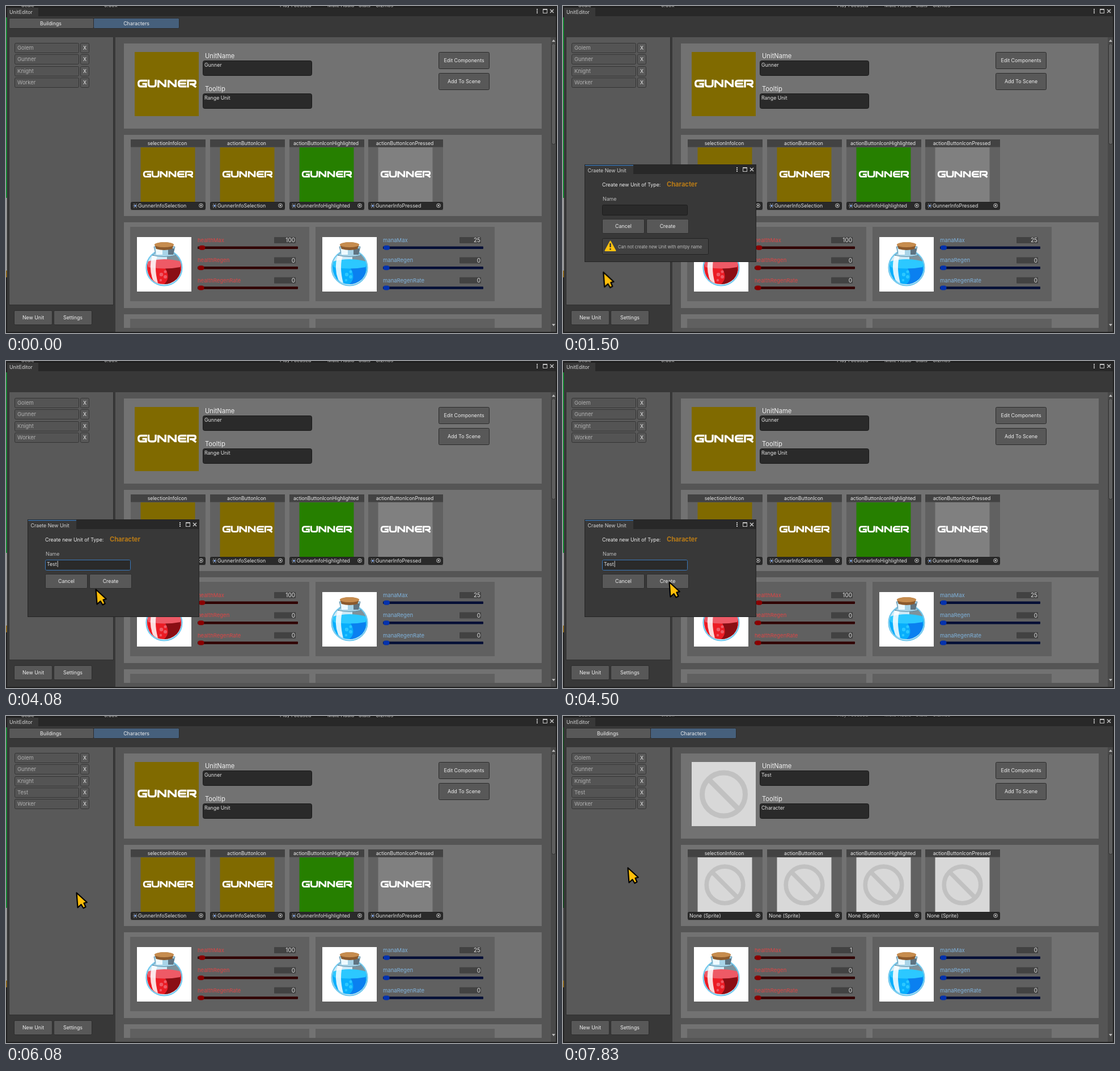
These frames come from a looping animation (972x576 px, 8000 ms). An HTML page:

```html
<!DOCTYPE html>
<html lang="en">
<head>
<meta charset="utf-8">
<title>Unit editor</title>
<style>
  html, body { margin: 0; width: 100%; height: 100%; overflow: hidden; background: #383838; }
  svg { display: block; width: 972px; height: 576px; }
  text { font-family: Inter, Roboto, sans-serif; white-space: pre; }
</style>
</head>
<body>
<svg id="stage" viewBox="0 0 972 576" xmlns="http://www.w3.org/2000/svg"></svg>
<script>
const LOOP = 8000;
const BLUE = '#46607c';

// Drawing helpers
const rect = (x, y, w, h, fill, rx = 0) =>
  `<rect x="${x}" y="${y}" width="${w}" height="${h}" fill="${fill}" rx="${rx}"/>`;
const framed = (x, y, w, h, fill, line = '#2c2c2c', rx = 2) =>
  `<rect x="${x + .5}" y="${y + .5}" width="${w - 1}" height="${h - 1}" fill="${fill}" stroke="${line}" rx="${rx}"/>`;
const text = (x, y, s, fill = '#e2e2e2', size = 8.8, anchor = 'start', weight = 400) =>
  `<text x="${x}" y="${y}" fill="${fill}" font-size="${size}" text-anchor="${anchor}" font-weight="${weight}">${s}</text>`;
const path = (d, fill, extra = '') => `<path d="${d}" fill="${fill}" ${extra}/>`;
const line = (d, color, width = 1) => path(d, 'none', `stroke="${color}" stroke-width="${width}"`);
const use = (id, x, y, scale = 1) => `<use href="#${id}" transform="translate(${x} ${y}) scale(${scale})"/>`;
const button = (x, y, w, h, label, fill = '#585858') =>
  framed(x, y, w, h, fill) + text(x + w / 2, y + h / 2 + 3.2, label, '#eee', 8.8, 'middle');

// Groups visible only in [from, to), registered in document order
const shown = [];
const during = (from, to, body) => {
  shown.push([from, to]);
  return `<g class="timed">${body}</g>`;
};

const LETTERS = [
  [5, 'M17 1.7H6Q1.7 1.7 1.7 6.9Q1.7 12 6 12H15V7.3H8.5'],
  [22.8, 'M1.7 0V8Q1.7 12 6 12H10.7Q14.3 12 14.3 8V0'],
  [40, 'M1.7 13.7V2.3L3 2.3L13 11.4H14.3V0'],
  [58, 'M1.7 13.7V2.3L3 2.3L13 11.4H14.3V0'],
  [75.8, 'M15.5 1.7H6Q1.7 1.7 1.7 6.9Q1.7 12 6 12H15.5M2 6.9H14.5'],
  [92.3, 'M1.7 13.7V1.7H12.5Q15 1.7 15 4.6Q15 8 12.5 8H5M9 8L16 13.2']
];

function potion(id, main, dark, light) {
  return `<g id="${id}">` + rect(0, 0, 96, 96, '#fff') +
    `<circle cx="48" cy="54" r="31.5" fill="#cfeaf6"/>` +
    path('M53 26Q78 30 77 46H53Z', '#7f929b') +
    path('M19 44Q48 38 77 44Q82 60 70 74Q60 83 48 83Q34 83 25 74Q15 60 19 44Z', main) +
    path('M50 55L76 52Q79 64 70 74Q60 83 48 83Q60 72 50 55Z', dark) +
    path('M19 43Q48 35 77 43Q79 49 76 53Q48 58 20 53Q18 48 19 43Z', light) +
    path('M27 33Q33 29 37 29Q29 52 37 81Q31 79 28 75Q20 54 27 33Z', '#fff', 'opacity=".85"') +
    `<circle cx="48" cy="54" r="31.5" fill="none" stroke="#72c9ee" stroke-width="2.2"/>` +
    path('M30 17H67L65 25Q63 30 69 32Q48 37 27 32Q33 30 32 25Z', '#a8d4e8', 'stroke="#5a8ca6"') +
    path('M33 21H45V31H34Z', '#eefaff') + path('M55 20H66L64 31H55Z', '#5f7482') +
    path('M31 13Q48 5 65 13L62 21Q48 25 34 21Z', '#8c5a2d') +
    `<ellipse cx="48" cy="13.5" rx="17" ry="4.5" fill="#c68c4e"/>` +
    [[50, 61, 2.5], [43, 66, 3.2], [50, 70, 3], [42, 76, 2.2]].map(([x, y, r]) =>
      `<circle cx="${x}" cy="${y}" r="${r}" fill="${light}"/>`).join('') + '</g>';
}

const defs = '<defs>' +
  '<g id="gunner" fill="none" stroke="#fff" stroke-width="3.4">' +
  LETTERS.map(([x, d]) => `<path transform="translate(${x} 48.8)" d="${d}"/>`).join('') + '</g>' +
  '<g id="empty">' + rect(0, 0, 113, 113, '#d8d8d8') +
  '<circle cx="56.5" cy="57" r="38" fill="none" stroke="#c1c1c1" stroke-width="9"/>' +
  line('M30 30.5L83 83.5', '#c1c1c1', 9) + '</g>' +
  potion('red', '#ec1c24', '#8a0e14', '#ee5a66') +
  potion('blue', '#08aefc', '#0a80f0', '#2cc8ff') + '</defs>';

const windowIcons = (x, y) =>
  [-3, 0, 3].map(d => rect(x - 1, y + d - 1, 2, 2, '#c4c4c4')).join('') +
  `<rect x="${x + 10.5}" y="${y - 3}" width="7" height="6.5" fill="none" stroke="#c4c4c4"/>` +
  line(`M${x + 10} ${y - 3}h8`, '#c4c4c4', 2) +
  line(`M${x + 23} ${y - 3}l6 6m0 -6l-6 6`, '#c4c4c4', 1.5);

function backdrop() {
  const strip = (y, c) => [[27, 'Scale'], [173, '0.60x'], [483, 'Play Focused'], [567, 'Mute Audio'],
    [622, 'Stats'], [652, 'Gizmos']].map(([x, s]) => text(x, y, s, c)).join('');
  const edge = (c, grey) => rect(0, 20, 1.5, 318, c) + rect(0, 338, 1.5, 128, grey) + rect(0, 466, 1.5, 12, '#a87a1c');
  return rect(0, 0, 972, 576, '#202020') +
    during(0, 7380, strip(2, '#c4c4c4') + edge('#12a538', '#b4b4b4')) +
    during(7380, LOOP, strip(1, '#8c8c8c') + edge('#124f20', '#5c5c5c'));
}

function chrome() {
  return rect(2, 3, 968, 571, '#383838') + rect(57, 3, 913, 15, '#282828') +
    text(6, 14.2, 'UnitEditor', '#d2d2d2') + windowIcons(937, 9) +
    rect(5, 55, 185, 472, '#2e2e2e') + rect(6, 55, 183, 471, '#595959') +
    rect(193, 55, 777, 519, '#555') +
    rect(961, 55, 9, 519, '#494949') + framed(962, 66, 8, 178, '#5f5f5f', '#333', 3) +
    path('M963 63h6l-3 -4z', '#bbb') + path('M963 560h6l-3 4z', '#bbb');
}

const tabs = () => framed(5, 21, 150, 19, '#585858') + framed(154, 21, 152, 19, BLUE) +
  text(79, 33.7, 'Buildings', '#eee', 8.8, 'middle') + text(230, 33.7, 'Characters', '#eee', 8.8, 'middle');

function row(i, name, fill = '#545454') {
  const y = Math.round(65 + i * 20.3);
  return framed(15, y, 114, 18, fill, '#343434') + text(20, y + 11.8, name, '#b0b0b0', 9.5) +
    framed(131, y, 16, 18, '#585858', '#343434') + text(139, y + 12, 'X', '#eee', 8.8, 'middle');
}

const sidebar = () => ['Golem', 'Gunner', 'Knight'].map((n, i) => row(i, n)).join('') +
  during(0, 5500, row(3, 'Worker')) +
  during(5500, LOOP, row(3, 'Test') + row(4, 'Worker')) +
  during(7380, 7420, row(3, 'Test', BLUE)) +
  button(14, 536, 68, 26, 'New Unit') + button(84, 536, 68, 26, 'Settings') +
  during(1080, 1250, button(14, 536, 68, 26, 'New Unit', BLUE));

function cards() {
  const panels = (y, h) => rect(219, y, 316, h, '#606060') + rect(546, y, 316, h, '#606060');
  const field = (y, label) => text(351, y - 4.2, label, '#f0f0f0', 11.2) + framed(347, y, 193, 27, '#2a2a2a', '#191919', 3);
  const heads = ['selectionInfoIcon', 'actionButtonIcon', 'actionButtonIconHighlighted', 'actionButtonIconPressed'];
  return [[66, 150], [227, 143], [381, 151], [543, 24]].map(([y, h]) => rect(208, y, 737, h, '#727272')).join('') +
    field(96, 'UnitName') + field(154, 'Tooltip') +
    button(763, 81, 90, 30, 'Edit Components') + button(763, 118, 90, 30, 'Add To Scene') +
    heads.map((h, i) => {
      const x = Math.round(220 + i * 139.8);
      return rect(x, 235, 132, 125, '#616161') + rect(x, 235, 132, 13.5, '#424242') +
        text(x + 64.5, 244.8, h, '#eee', 8.6, 'middle') + framed(x, 345, 132, 14, '#2a2a2a', '#202020') +
        `<circle cx="${x + 124}" cy="351.5" r="3.4" fill="none" stroke="#c4c4c4"/>` +
        `<circle cx="${x + 124}" cy="351.5" r="1.4" fill="#c4c4c4"/>`;
    }).join('') +
    panels(389, 131) + panels(551, 16) + use('red', 231, 407) + use('blue', 558, 407);
}

function stats(health, mana) {
  const set = (x, name, color, track, knob, top) => ['Max', 'Regen', 'RegenRate'].map((part, i) => {
    const y = 407 + i * 35.4, value = i ? 0 : top;
    return text(x, y + 8.8, name + part, color, 9.5) + rect(x + 135, y, 38, 11, '#424242', 1) +
      text(x + 172, y + 9.2, value, '#e0e0e0', 10, 'end') + rect(x, y + 16.5, 177, 4.5, track, 1) +
      rect(x + .5 + value * .018, y + 14.8, 11, 8, knob, 4);
  }).join('');
  return set(338, 'health', '#dc4646', '#300202', '#8a0000', health) +
    set(665, 'mana', '#7fb2dc', '#040f36', '#0532ac', mana);
}

function unit(name, tip, fills, sprites) {
  const image = (x, y, s, fill) => fill
    ? rect(x, y, 113 * s, 113 * s, fill) + use('gunner', x, y, s)
    : use('empty', x, y, s);
  return text(350, 107, name) + text(350, 164.6, tip) + image(227, 81, 1, fills[0]) +
    sprites.map((s, i) => {
      const x = Math.round(220 + i * 139.8);
      const icon = fills[i] ? `<rect x="${x + 5}" y="349" width="6" height="6" fill="none" stroke="#aaa" stroke-dasharray="2 2"/>` +
        rect(x + 6.5, 350.5, 3, 3, '#8fb8ff') : '';
      return image(x + 17.5, 249, 96 / 113, fills[i]) + icon + text(x + (icon ? 13 : 3), 355, s);
    }).join('');
}

function dialog() {
  const typing = [[2710, '', 71.5], [2830, 'T', 77.5], [3080, 'Te', 83], [3290, 'Tes', 87.7], [3630, 'Test', 90.7]];
  const warning = framed(69, 409, 188, 29, '#414141', '#232323') +
    path('M83.5 414.5L92.5 431H74.5Z', '#ffc20e', 'stroke="#ffc20e" stroke-width="2" stroke-linejoin="round"') +
    rect(82.3, 418, 2.4, 7, '#333') + rect(82.3, 427, 2.4, 2.4, '#333') +
    text(97, 426.5, 'Can not create new Unit with emtpy name', '#bcbcbc', 7.5);
  return during(1250, 5500,
    framed(38, 279, 303, 172, '#383838', '#242424', 0) + rect(39, 280, 301, 16, '#282828') +
    rect(39, 280, 85, 16, '#383838') + rect(39, 280, 85, 1.3, '#3a79bb') +
    text(43.5, 292.8, 'Craete New Unit', '#d2d2d2') + windowIcons(307, 288) +
    text(69, 317.8, 'Create new Unit of Type:', '#eee') +
    text(183, 318.4, 'Character', '#b97b17', 11.1, 'start', 700) +
    text(70, 342.6, 'Name', '#bcbcbc') +
    framed(69, 350, 151, 19, '#2a2a2a', '#1c1c1c') +
    button(69, 375, 75, 26, 'Cancel') + button(147, 375, 75, 26, 'Create')) +
    during(1250, 2830, warning) +
    during(2710, 5500, `<rect x="69.5" y="350.5" width="150" height="18" rx="2" fill="none" stroke="#3a79bb"/>`) +
    typing.map(([t, s, x], i) =>
      during(t, i < 4 ? typing[i + 1][0] : 5500, text(72, 361, s) + rect(x, 352, 1, 11, '#ccc'))).join('') +
    during(5000, 5500, button(147, 375, 75, 26, 'Create', BLUE));
}

const cursor = () => {
  const beam = 'M-6 -11H6M0 -11V12M-6 12H6';
  const arrow = path('M-.5 -.5L1.5 25.5L7.5 20L11.5 26.5L15.5 24.2L12.5 17.5L17.8 16.2Z', '#ffbf0a',
    'stroke="#000" stroke-width="2.2" stroke-linejoin="round"');
  return '<g id="cursor">' + during(380, 1800, arrow) +
    during(1800, 3680, line(beam, '#000', 5) + line(beam, '#ffc20e', 2)) +
    during(3680, LOOP, arrow) + '</g>';
};

const stage = document.getElementById('stage');
stage.innerHTML = defs + backdrop() + chrome() +
  during(0, 1250, tabs()) + during(5500, LOOP, tabs()) + sidebar() + cards() +
  during(0, 7420, unit('Gunner', 'Range Unit', ['#806a00', '#806a00', '#267f00', '#808080'],
    ['GunnerInfoSelection', 'GunnerInfoSelection', 'GunnerInfoHighlighted', 'GunnerInfoPressed']) + stats(100, 25)) +
  during(7420, LOOP, unit('Test', 'Character', [], Array(4).fill('None (Sprite)')) + stats(1, 0)) +
  during(1170, 1250, '<rect x="38.5" y="279.5" width="302" height="171" fill="none" stroke="#434343"/>') +
  dialog() + cursor();

const timing = { duration: LOOP, iterations: Infinity };
stage.querySelectorAll('.timed').forEach((el, i) => {
  const [from, to] = shown[i];
  const steps = [[0, from ? 0 : 1]];
  if (from) steps.push([from, 1]);
  steps.push([to, to < LOOP ? 0 : 1]);
  if (to < LOOP) steps.push([LOOP, 0]);
  el.animate(steps.map(([t, opacity]) => ({ opacity, offset: t / LOOP, easing: 'step-end' })), timing);
});

const track = [
  [0, 316, 566], [380, 316, 566], [470, 285, 540], [560, 205, 527], [650, 115, 526], [740, 46, 540],
  [790, 36, 549], [830, 41, 554], [1250, 41, 554], [1400, 48, 520], [1600, 95, 420], [1760, 118, 370],
  [1880, 122, 364], [3630, 122, 364], [3700, 128, 378], [3800, 146, 398], [3880, 154, 402], [4060, 154, 402],
  [4080, 159, 403], [4250, 172, 397], [4400, 184, 389], [4500, 188, 390], [5460, 188, 390], [5600, 166, 356],
  [5750, 135, 322], [5880, 124, 313], [6060, 124, 313], [6080, 125, 312], [6250, 129, 306], [6630, 129, 306],
  [6750, 118, 270], [6900, 75, 180], [7000, 40, 122], [7080, 28, 112], [7170, 22, 131], [7630, 22, 131],
  [7720, 66, 200], [7830, 115, 268], [LOOP, 115, 268]
];
document.getElementById('cursor').animate(track.map(([t, x, y]) =>
  ({ offset: t / LOOP, transform: `translate(${x}px, ${y}px)` })), timing);
</script>
</body>
</html>
```
